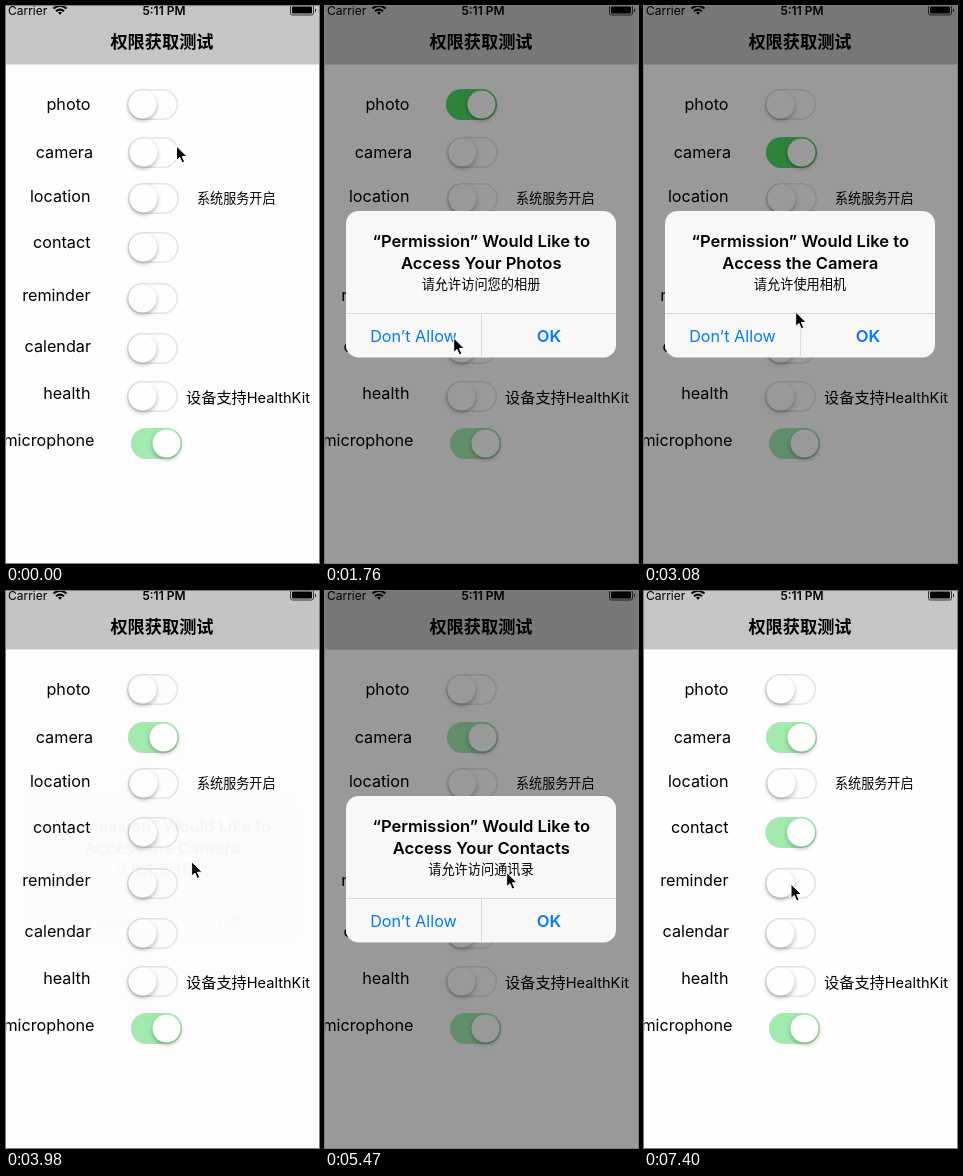
Write an HTML page that moves like this. It is 313 by 557 pixels and loops after 8 s.

```html
<!DOCTYPE html>
<html lang="zh-CN">
<head>
<meta charset="utf-8">
<title>Permission switches</title>
<style>
html, body { margin: 0; width: 100%; height: 100%; overflow: hidden; background: #fefefe; }
svg { display: block; width: 100%; height: 100%; font: 16.2px Inter, "Noto Sans CJK SC", "Noto Sans CJK", sans-serif; }
.end { text-anchor: end; }
.mid { text-anchor: middle; }
.bold { font-weight: 600; }
.knob { filter: drop-shadow(0 2.5px 2px rgba(0, 0, 0, .3)); }
</style>
</head>
<body>
<svg viewBox="0 0 313 557" preserveAspectRatio="none">
  <rect width="313" height="557" fill="#fefefe"/>
  <rect width="313" height="58.5" fill="#c5c5c5"/>
  <text x="2" y="8.5" font-size="12">Carrier</text>
  <g fill="none" stroke="#000" stroke-width="2">
    <path d="M47.5 2.6Q54 -3 60.5 2.6M50 5.3Q54 1.9 58 5.3"/>
    <path d="M52 6.6Q54 5 56 6.6L54 8.8Z" fill="#000" stroke="none"/>
  </g>
  <text class="mid bold" x="158" y="8.5" font-size="12">5:11 PM</text>
  <rect x="284.5" y="-1" width="23" height="10" rx="2" fill="none" stroke="#333"/>
  <rect x="286" y=".5" width="20" height="7" rx="1"/>
  <path d="M309 2.5q2 1.5 0 4z"/>
  <text class="mid bold" x="156" y="42" font-size="17.2">权限获取测试</text>
  <g id="rows"></g>
  <text x="191" y="196.5" font-size="13.1">系统服务开启</text>
  <text x="180" y="396.5" font-size="15.2">设备支持<tspan font-size="14.6">HealthKit</tspan></text>
  <rect id="dim" width="313" height="557"/>
  <g id="card">
    <rect x="21" y="205" width="270" height="146.5" rx="12.5" fill="#f8f8f8"/>
    <path d="M21 307.5H291M156.5 307.5V351.5" stroke="#d9d9dc"/>
    <g class="mid bold" font-size="16.6">
      <text x="156.3" y="241">“Permission” Would Like to</text>
      <text id="ask" x="156.3" y="263"></text>
    </g>
    <text class="mid" id="note" x="156" y="283" font-size="13.2"></text>
    <g class="mid" fill="#007aff">
      <text x="88.5" y="335.5">Don’t Allow</text>
      <text class="bold" x="224" y="335.5" font-size="16.6">OK</text>
    </g>
  </g>
  <path id="cursor" d="M0 0V14.5L3.3 11.4L5.6 16.8L8.1 15.7L5.8 10.5H10.5Z" stroke="#fff"/>
</svg>
<script>
const LOOP = 8000;
const byId = id => document.getElementById(id);
const clamp = p => Math.min(1, Math.max(0, p));
const smooth = p => p * p * (3 - 2 * p);
const ramp = (t, start, len) => clamp((t - start) / len);
const easeOut = p => 1 - (1 - p) ** 2;

// label, right edge, baseline, switch left, switch centre
const rows = [
  ['photo', 84.5, 104, 121, 98.5],
  ['camera', 87, 151.5, 122, 146.5],
  ['location', 84.5, 196, 122, 192.5],
  ['contact', 84.5, 242, 121.5, 241.5],
  ['reminder', 84.5, 295, 121, 292.5],
  ['calendar', 85, 345.5, 121, 342.5],
  ['health', 84.5, 393, 121, 390.5],
  ['microphone', 88.5, 439.5, 125, 437.5]
];

// tap: switch turned on, open: alert appears, answer: alert button pressed
const alerts = [
  { row: 0, tap: 500, open: 640, answer: 1880, allow: false, ask: 'Access Your Photos', note: '请允许访问您的相册' },
  { row: 1, tap: 2480, open: 2610, answer: 3650, allow: true, ask: 'Access the Camera', note: '请允许使用相机' },
  { row: 3, tap: 4900, open: 5020, answer: 6065, allow: true, ask: 'Access Your Contacts', note: '请允许访问通讯录' }
];

// time, x, y
const path = [
  [130, 170.5, 140], [290, 149, 99], [880, 149, 99], [1500, 130, 329], [1760, 128.7, 332],
  [1900, 128.7, 332], [2250, 153.8, 147], [2700, 153.8, 147], [3080, 151.7, 306], [3400, 215, 326],
  [3700, 215, 326], [4150, 172, 245], [4580, 154.6, 203], [4860, 150, 238], [5250, 150, 238],
  [5700, 215, 327], [6070, 215, 327], [6210, 176.6, 325.2], [6360, 147, 322], [7400, 147, 293]
];

byId('rows').innerHTML = rows.map(([name, right, base, x, cy]) =>
  `<text class="end" x="${right}" y="${base}">${name}</text>
  <g transform="translate(${x} ${cy - 15.5})">
    <rect x=".75" y=".75" width="49.5" height="29.5" rx="14.75" fill="#fefefe" stroke="#e3e3e3" stroke-width="1.5"/>
    <rect class="fill" width="51" height="31" rx="15.5"/>
    <circle class="knob" cy="15.5" r="14" fill="#fefefe"/>
  </g>`).join('');
const fills = document.querySelectorAll('.fill');
const knobs = document.querySelectorAll('.knob');
const pale = '#a3eaaf', vivid = '#4cd964';

function setSwitch(i, on, color) {
  fills[i].setAttribute('fill', color);
  fills[i].setAttribute('opacity', on);
  knobs[i].setAttribute('cx', 15.5 + 20 * on);
}

function cursorAt(t) {
  const next = path.findIndex(k => k[0] > t);
  if (next === 0) return path[0].slice(1);
  if (next < 0) return path[path.length - 1].slice(1);
  const [t0, x0, y0] = path[next - 1], [t1, x1, y1] = path[next];
  const p = smooth((t - t0) / (t1 - t0));
  return [x0 + (x1 - x0) * p, y0 + (y1 - y0) * p];
}

function draw(t) {
  for (const a of alerts) {
    const on = smooth(ramp(t, a.tap, 250));
    const off = a.allow ? 0 : smooth(ramp(t, a.answer, 250));
    setSwitch(a.row, on - off, t < a.answer ? vivid : pale);
  }

  const a = alerts.filter(k => t >= k.open).pop() || alerts[0];
  const shown = easeOut(ramp(t, a.open, 400));
  const alpha = shown - easeOut(ramp(t, a.answer, 360));
  const scale = 1.2 - 0.2 * shown;
  byId('ask').textContent = a.ask;
  byId('note').textContent = a.note;
  byId('dim').setAttribute('opacity', 0.4 * alpha);
  byId('card').setAttribute('opacity', Math.sqrt(alpha) * 0.3 + alpha * 0.7);
  byId('card').setAttribute('transform', `translate(156 278) scale(${scale}) translate(-156 -278)`);

  byId('cursor').setAttribute('transform', `translate(${cursorAt(t)})`);
}

rows.forEach((r, i) => setSwitch(i, i === 7 ? 1 : 0, pale));
const begin = performance.now();
function tick() {
  draw((performance.now() - begin) % LOOP);
  requestAnimationFrame(tick);
}
tick();
</script>
</body>
</html>
```
